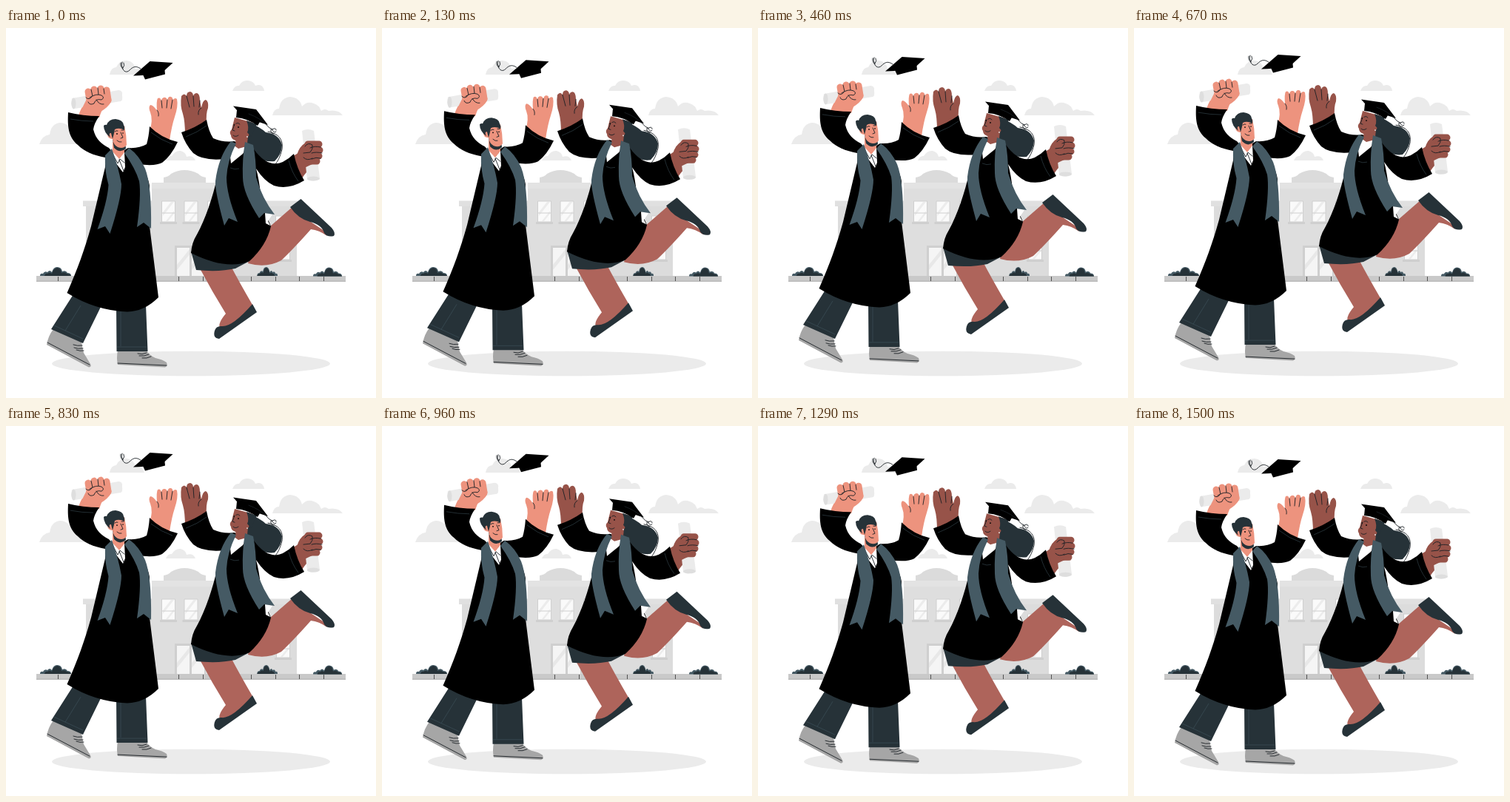
Animation of 500x500 px, one loop 1.54 s. Source, as an HTML page:

```html
<!DOCTYPE html>
<html lang="en">
<head>
<meta charset="utf-8">
<title>Graduation jump</title>
<style>
html, body { margin: 0; width: 100%; height: 100%; overflow: hidden; background: #fff; }
svg { display: block; width: 100vw; height: 100vh; }
.cloud { fill: #ebebeb; }
.dark { fill: #263238; }
.slate { fill: #455a64; }
.paper { fill: #ebebeb; }
.paper-end { fill: #dedede; }
.white { fill: #fff; }
.shoe { fill: #a6a6a6; }
.his { fill: #ed937e; }
.hers { fill: #975349; }
.leg { fill: #ae645b; }
.fingers { fill: none; stroke-width: 9; stroke-linecap: round; }
.his.fingers { fill: none; stroke: #ed937e; }
.hers.fingers { fill: none; stroke: #975349; }
.line { fill: none; stroke: #1a2024; stroke-width: .9; stroke-linecap: round; stroke-linejoin: round; }
.seam { fill: none; stroke: #455a64; stroke-width: .5; }
.pane { fill: #fafafa; stroke: #cfcfcf; stroke-width: 1; }
</style>
</head>
<body>
<svg viewBox="0 0 500 500">
  <defs>
    <g id="window">
      <path class="pane" d="M.5 0H18.500V28H.5Z"/>
      <path d="M2 15 13 1h4L2 20ZM6 27 17 13v4L9 27Z" fill="#ececec"/>
      <path d="M0 16H19" stroke="#cfcfcf"/>
      <path d="M-2 28H21v3H-2Z" fill="#cfcfcf"/>
    </g>
    <g id="bush">
      <path class="slate" d="M0 12Q0 8 4 9Q6 5 10 7Q13 3 16 7Q18 0 23 0Q29 0 30 6Q35 4 37 8Q42 8 42 12Z"/>
      <path class="dark" d="M6 12Q7 8 10 9Q13 6 16 9Q18 2 23 1Q28 1 29 8Q34 6 36 9Q40 9 42 12Z"/>
    </g>
  </defs>

  <g class="cloud">
    <ellipse cx="250" cy="453.500" rx="188" ry="16.800"/>
    <path d="M45 157Q49 145 59 144Q61 129 73 128Q85 128 90 142Q103 140 110 157Z"/>
    <path d="M140 63Q142 53 149 53Q153 44 163 44Q173 45 175 55Q184 53 187 63Z"/>
    <path d="M306 85Q309 77 315 78Q319 70 327 71Q335 72 337 78Q347 74 349 85Z"/>
    <path d="M360 118Q362 109 369 109Q371 94 384 93Q397 94 400 106Q407 98 416 102Q423 104 426 112Q431 108 436 112Q449 110 455 118Z"/>
    <path d="M216 179Q219 172 224 173Q229 165 236 166Q243 168 244 174Q253 171 256 179Z"/>
  </g>

  <g id="school">
    <path d="M108 240H393V336H108Z" fill="#dcdcdc"/>
    <path d="M104 233.500H394V241H104Z" fill="#e0e0e0"/>
    <path d="M197 216H302V336H197Z" fill="#dedede"/>
    <path d="M197 209H302V217H197Z" fill="#e3e3e3"/>
    <path d="M213 209V202Q220 201 223 197Q241 187 260 197Q263 201 270 202V209Z" fill="#dbdbdb"/>
    <use href="#window" x="210" y="234"/>
    <use href="#window" x="240.500" y="234"/>
    <use href="#window" x="272" y="234"/>
    <use href="#window" x="364" y="254"/>
    <use href="#window" x="365" y="285"/>
    <path d="M228 294H270V336H228Z" fill="#cfcfcf"/>
    <path d="M231 297H248V336H231ZM251 297H268V336H251Z" fill="#f5f5f5"/>
    <path d="M231 320 248 299V306L231 327ZM251 320 268 299V306L251 327Z" fill="#e8e8e8"/>
  </g>
  <path d="M41 335H459V342H41Z" fill="#c9c9c9"/>
  <path d="M41 342.300H459" stroke="#8b8b8b" stroke-width=".7"/>
  <path d="M70.500 336v6M233.500 336v6M266.500 336v6M331.500 336v6M364.500 336v6M396.500 336v6M429.500 336v6" stroke="#333" stroke-width=".8"/>
  <use href="#bush" x="46" y="323"/>
  <use href="#bush" transform="translate(367 323) scale(-.66 1)"/>
  <use href="#bush" transform="translate(415 323.500) scale(.93 1)"/>

  <g id="jumpers">
    <g id="flying-cap">
      <path d="M184 61 188 69.500 215 62.500 214 52Z"/>
      <path d="M172 64.500 194.500 45 225.500 47 213.500 58 184 64Z"/>
      <path class="line" d="M182 55C175 50 171 53 167 57C163 61 159 59 157 54M155 47Q154 52 158 55M157 46Q155 51 158 54M159 47Q161 51 158 54"/>
    </g>

    <g id="man">
      <path class="shoe" d="M64 407Q57 416 55 428L112 458.500Q116 458 114 454L105 439Q103 431 102 424ZM151 435Q149 446 151 455L215 458.500Q219 457 217 452Q212 448 202 446Q193 442 189 435Z"/>
      <path class="dark" d="M91 360 128 377 104 426 61 407ZM149 374H189L191.500 437H149.500Z"/>
      <path class="seam" d="M65 402 104 420M150 431H190M101 375 80 409M155 382V430"/>
      <path class="line" d="M56 425 113 455M151 453 217 456M91 428Q96 430 103 429M92 432Q97 434 104 433M95 435Q100 437 105 436M178 440Q184 442 190 439M180 443Q187 444 193 441M184 446Q190 447 196 444"/>

      <path class="his" d="M98 118Q102 106 109 98L134 104Q129 111 126 121Z"/>
      <path class="his" d="M194 140Q199 124 195 114Q192 107 195 104Q199 104 204 112Q203 98 205 95Q209 93 210 99Q210 95 213 94Q217 93 218 98Q219 92 223 93Q226 94 225 98Q228 93 231 96Q233 105 228 120Q224 132 221 152Z"/>
      <path d="M84 114Q104 119 126 119Q119 129 118 137C121 150 129 157 139 162L148 172 165 162Q180 163 190 157Q193 147 194 133Q210 149 232 154Q223 173 211 182Q202 187 178 184Q190 192 194 213L194 268 206 364Q187 383 164 383.500Q121 382 82.500 358C97 325 106 300 115 268L134 188V175C118 172 106 167 97 158C84 147 83 133 84 114Z"/>
      <path class="seam" d="M87 123Q103 126 118 126M196 141Q210 152 225 157"/>
      <path class="line" d="M210 98 211 108M218 97 217 108M225 97 223 109M204 111Q207 114 206 119"/>

      <path class="his" d="M144 154H160L160 169 153 181 144 168Z"/>
      <path class="white" d="M144 167 153 177 160 168 161 188 158 195 145 178Z"/>
      <path class="line" d="M144 170 151 183 154 177 160 182M153 178 159 193"/>
      <path class="slate" d="M134 172 143 163Q152 188 156 211Q156 230 140.500 278L134 268 123.500 272Q137 235 138.500 212Q133 193 134 172ZM160 169 166 162Q180 172 188 190Q197 213 196 271L186 263 177 269Q183 226 180 207Q175 190 160 169Z"/>

      <path class="dark" d="M144 150 161 154 162 163Q154 170 146 162Z"/>
      <path class="his" d="M143 136 160 132Q163 145 163 158Q159 164 151 161Q145 158 144 150Q137 150 137 143Q139 139 143 142Z"/>
      <path class="dark" d="M141 148Q132 141 132 132Q134 130 136 131Q139 123 148 123Q158 124 159 131Q161 134 160 138Q153 134 147 137Q146 143 144 150L142 142Q138 141 141 148Z"/>
      <path class="line" d="M147 140Q149 138 151 139M156 138 159 138M155 141 158 148 155 149M150 152Q153 155 156 154"/>
      <circle cx="150" cy="143" r=".9"/><circle cx="158" cy="142" r=".8"/>

      <path class="paper" d="M89 95 152 84Q158 84 157 91Q158 98 155 99L93 109Q89 109 88 102Z"/>
      <ellipse class="paper-end" cx="91.500" cy="102" rx="3" ry="7.500"/>
      <path class="his" d="M101 112 109 96 138 90Q144 95 142 100Q138 107 128 113L124 117Z"/>
      <path class="his fingers" d="M111 86 113 97M119 83 120 95M128 82 129 94M136 84 138 97"/>
      <path class="line" d="M115 83 117 92M124 81 125 90M132 82 133 89M108 94Q112 98 116 93M113 94Q122 88 129 91Q134 94 129 97Q121 95 119 102Q113 105 111 100M122 97Q126 104 132 103"/>
    </g>

    <g id="woman">
      <path class="leg" d="M340 264 357 268 388 241 412 262 430 274 434 281Q423 273 412 272Q388 299 372 314Q352 325 327 318ZM262 325 304 322Q315 343 333 374Q313 405 289 405Q286 399 297 386Q279 357 262 325Z"/>
      <path class="dark" d="M398.500 231 384 242Q395 258 411 262Q427 266 430 277Q434 283 443 281Q446 277 440 270ZM333 373 339 384 288 420Q279 419 282 409Q284 402 292 403Q306 404 333 373ZM250 302 257 327Q288 330 310 325L329 315Z"/>

      <path class="dark" d="M326 126Q345 135 351 141Q369 143 373 158Q373 170 363 180Q350 182 338 173Q328 164 324 150Z"/>
      <path class="line" d="M354 140Q376 144 373 164Q370 177 364 184"/>

      <path class="hers" d="M386 174Q397 169 399 163L423 184Q412 185 400 203Z"/>
      <path class="hers" d="M242 145Q242 126 239 116Q235 105 237 92Q241 87 244 92Q244 86 249 86Q253 87 253 92Q254 88 258 88Q262 89 262 98L264 108Q266 97 270 97Q274 99 273 108Q270 115 271 130Z"/>
      <path d="M237 141Q256 135 271 124Q274 140 280 149Q294 155 308 153L325 158 335 164Q354 190 374 181Q382 177 389 170Q393 190 403 206Q382 219 362 213Q349 207 338 190Q342 205 344 224Q349 239 351 252L358 268Q352 294 329 315Q298 328 250 304Q251 290 258 279C269 259 279 231 286 199L296 177Q266 180 253 169Q242 157 237 141Z"/>
      <path class="seam" d="M243 147Q259 141 271 132M382 179Q386 195 395 207M303 189Q309 192 315 190"/>
      <path class="line" d="M244 92 248 107M253 92 254 106M262 98 261 107M264 108Q259 111 260 117"/>
      <path class="white" d="M350 250 360 252 354 261 357 267 351 264Z"/>

      <path class="hers" d="M311 146H327L325 166 308 177Z"/>
      <path class="white" d="M307 158 314 163 325 160 320 170 304 183 303 174Z"/>
      <path class="slate" d="M304 153 311 156Q299 180 298 202Q298 225 313 262L301 257 295 267Q282 220 283 207Q287 174 304 153ZM323 154 334 158Q338 177 338 202Q346 230 363 252L349 250 342 257Q320 223 320 202Q319 178 323 154Z"/>

      <path class="hers" d="M309 121 334 128Q331 141 326 149Q319 155 310 152Q304 150 304 145Q301 141 305 137Z"/>
      <path class="dark" d="M325 125 339 130 331 147 326 141Q329 135 325 125Z"/>
      <path class="line" d="M311 129Q314 127 316 130M309 130 306 138 309 139M307 145Q310 148 314 145"/>
      <circle cx="314" cy="134" r=".9"/><circle cx="308" cy="131" r=".8"/>
      <circle cx="326" cy="147" r=".9" fill="#eee"/>
      <path d="M312 111 311 121Q326 122 340 132L346 122Z"/>
      <path d="M307 105.500 338 110 354 131 320 120Z"/>
      <path class="line" d="M328 116Q344 122 352 131Q356 136 360 137M360 137Q365 134 365 138M359 137Q363 143 365 140M358 137Q357 143 362 143"/>

      <path class="paper" d="M400 139Q408 135 416 139L424 203Q416 209 407 205Z"/>
      <ellipse class="paper-end" cx="415.500" cy="203.500" rx="8.500" ry="3"/>
      <path class="hers" d="M393 172Q396 160 405 155L418 158 424 180Q408 186 398 192Z"/>
      <path class="hers fingers" d="M408 157 413 157M411 157 423 157M411 165 424 165M411 173 423 173M411 180 420 180"/>
      <path class="line" d="M425 161Q417 159 411 162M427 169Q419 167 413 169M425 176Q419 174 413 177M404 160Q408 154 414 158Q415 164 411 168L402 169M402 175Q407 180 414 176"/>
    </g>
  </g>
</svg>
<script>
const LOOP = 1540, STEP = 1000 / 24, HALF = 18, HEIGHT = 10;
const jumpers = document.getElementById("jumpers");

// Linear rise and fall, held at 24 steps per second.
function draw(now) {
  const step = Math.floor((now % LOOP + 3) / STEP) % 37;
  const lift = HEIGHT * (1 - Math.abs(1 - step / HALF));
  jumpers.setAttribute("transform", `translate(0 ${-lift})`);
  requestAnimationFrame(() => draw(performance.now() - start));
}

const start = performance.now();
draw(0);
</script>
</body>
</html>
```
